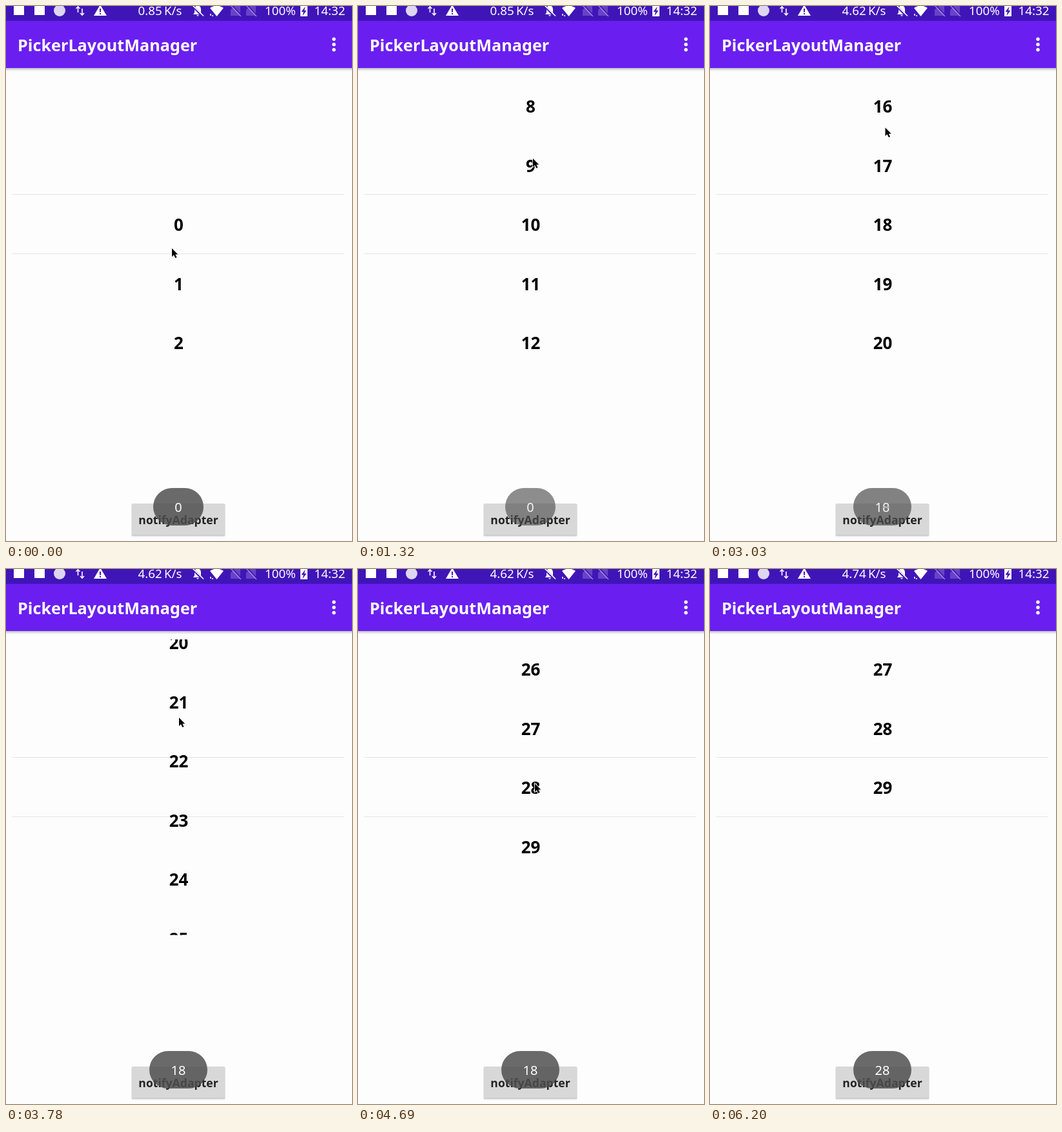
An HTML page for the animation above (6.79 s loop, 536 px wide and 828 px high).

```html
<!DOCTYPE html>
<html lang="en">
<head>
<meta charset="utf-8">
<title>Picker demo</title>
<style>
  html, body { margin: 0; width: 100%; height: 100%; overflow: hidden; background: #fdfdfd; }
  svg { display: block; width: 536px; height: 828px; }
  text { font-family: "Noto Sans", "Open Sans", sans-serif; }
  .bold { font-weight: 700; }
  .mid { text-anchor: middle; }
  .status { font-size: 18.8px; fill: #fff; }
  #items { font-size: 26px; }
  #toasts text { font-size: 20px; fill: #fff; }
</style>
</head>
<body>
<svg viewBox="0 0 536 828">
  <defs>
    <clipPath id="list"><rect x="10" y="109" width="514" height="457.5"/></clipPath>
    <linearGradient id="shade" x2="0" y2="1">
      <stop stop-color="#000" stop-opacity=".24"/>
      <stop offset="1" stop-color="#000" stop-opacity="0"/>
    </linearGradient>
    <g id="sim">
      <path d="M-1 -1H7V15H-8V6Z" fill="#fff" opacity=".2"/>
      <path d="M-7 -2L9 15" stroke="#4015b8" stroke-width="2"/>
      <path d="M-8 -1L8 16" stroke="#fff" stroke-width="1.6" opacity=".4"/>
    </g>
  </defs>

  <rect width="536" height="828" fill="#fdfdfd"/>
  <path d="M10 291.5H524M10 383.5H524" stroke="#e4e4e4"/>
  <g clip-path="url(#list)">
    <g id="items" class="bold mid"></g>
    <ellipse id="glow" cx="267" rx="771" fill="#6a1ff0"/>
  </g>

  <!-- app bar -->
  <rect y="96" width="536" height="5" fill="url(#shade)"/>
  <rect y="22" width="536" height="74" fill="#6a1ff0"/>
  <text x="18" y="69.5" class="bold" font-size="25.2" fill="#fff">PickerLayoutManager</text>
  <g fill="#fff"><circle cx="508" cy="51.3" r="2.7"/><circle cx="508" cy="59.5" r="2.7"/><circle cx="508" cy="67.7" r="2.7"/></g>

  <!-- status bar -->
  <rect width="536" height="23" fill="#4015b8"/>
  <g fill="#fff">
    <rect x="12" y="0" width="16" height="14"/>
    <rect x="44" y="0" width="16" height="14"/>
    <circle cx="83" cy="7" r="9" fill="#dcd6f2"/>
    <path d="M111.5 10V1M108.5 4L111.5 1L114.5 4M118 4V14M115 11L118 14L121 11" fill="none" stroke="#fff" stroke-width="1.6"/>
    <path d="M146 -2L156 15H136Z"/>
    <path d="M146 4V9.5M146 11V13" stroke="#4015b8" stroke-width="2"/>
    <path d="M290 13H304L302 10V5Q302 0 297 -1Q292 0 292 5V10ZM295 14H299Q297 17.5 295 14Z"/>
    <path d="M288 -1L305 16" stroke="#4015b8" stroke-width="3.5"/>
    <path d="M289 -1L306 15.5" stroke="#fff" stroke-width="1.6"/>
    <path d="M316 3Q326.5 -4 337 3L326.5 16Z"/>
    <path d="M317 12V15M320 14V16" stroke="#fff" stroke-width="1.5"/>
    <use href="#sim" x="356"/>
    <use href="#sim" x="380"/>
    <path d="M456 0H459V-2H464V0H467V16H456Z"/>
    <path d="M463.5 1L457.5 9H460.8L459.5 15L465.5 7H462.2Z" fill="#4015b8"/>
  </g>
  <g class="status">
    <text id="speed" x="204.5" y="14"></text>
    <text x="401" y="14">100%</text>
    <text x="477.5" y="14">14:32</text>
  </g>

  <!-- button -->
  <rect x="194" y="770" width="146" height="51.5" rx="3" fill="#000" opacity=".09"/>
  <rect x="195" y="771" width="144" height="49" rx="2" fill="#000" opacity=".12"/>
  <rect x="195" y="770" width="144" height="48.5" rx="2" fill="#d8d8d8"/>
  <text x="267" y="802" class="bold mid" font-size="17.6" fill="#222">notifyAdapter</text>

  <g id="toasts" class="mid"></g>
  <path id="cursor" d="M0 0V13L3 10.2L5.3 15L7.6 14L5.3 9.5H9.3Z" stroke="#fff" stroke-width="1.6" paint-order="stroke"/>
</svg>
<script>
const LOOP = 6790, FRAME = 1000 / 17.5, STEP = 91.5;
const $ = id => document.getElementById(id);
const clamp = u => Math.min(1, Math.max(0, u));
const easeIn = u => u * u;
const easeOut = u => 1 - (1 - u) ** 2;
const smooth = u => u * u * (3 - 2 * u);
const mix = (a, b, u) => a + (b - a) * u;

// drags and flings: start, end, first row, last row, easing
const scrolls = [
  [430, 690, 0, 2.7, easeIn], [690, 1270, 2.7, 10, easeOut],
  [2120, 2330, 10, 13.15, easeIn], [2330, 2740, 13.15, 18, easeOut],
  [3440, 3650, 18, 20.39, easeIn], [3650, 4555, 20.39, 28, easeOut],
  [4705, 4870, 28, 29, easeOut]
];

// time, x, y
const pointer = [
  [0, 257, 375], [400, 262, 430], [640, 271, 236], [1400, 271, 236],
  [2090, 280, 390], [2330, 275, 245], [2464, 274, 217], [2740, 272, 134],
  [2860, 272, 134], [3400, 270, 350], [3650, 268, 230], [4150, 268, 230],
  [4650, 274, 332], [4705, 274, 332], [4870, 300, 246], [5300, 310, 241],
  [5800, 310, 241], [6200, 414, 838]
];

// time, strength of the overscroll glow
const glowKeys = [[4840, 0], [5000, .48], [5390, .333], [5495, 0]];

// value, fade-in start, fade-out start, half width
const toasts = [
  [0, -1000, 1200, 39], [10, 1390, 2860, 45],
  [18, 2900, 5080, 45], [28, 5080, 9000, 45]
];

function along(keys, t, ease = u => u) {
  const i = keys.findIndex(k => k[0] > t);
  if (i < 0) return keys[keys.length - 1].slice(1);
  if (i === 0) return keys[0].slice(1);
  const a = keys[i - 1], b = keys[i];
  const u = ease((t - a[0]) / (b[0] - a[0]));
  return a.slice(1).map((v, k) => mix(v, b[k + 1], u));
}

function row(t) {
  let p = 0;
  for (const [t0, t1, a, b, ease] of scrolls)
    if (t >= t0) p = mix(a, b, ease(clamp((t - t0) / (t1 - t0))));
  return p;
}

$('items').innerHTML = Array.from({ length: 30 }, (_, i) =>
  `<text x="267.5" y="${348 + i * STEP}">${i}</text>`).join('');
$('toasts').innerHTML = toasts.map(([value, , , half]) =>
  `<g><rect x="${267 - half}" y="746" width="${half * 2}" height="58" rx="29" fill="#4d4d4d" opacity=".83"/>` +
  `<text x="267" y="782.5">${value}</text></g>`).join('');
const toastNodes = [...$('toasts').children];

function draw(t) {
  $('items').setAttribute('transform', `translate(0 ${-row(t) * STEP})`);
  $('cursor').setAttribute('transform', `translate(${along(pointer, t, smooth).join(' ')})`);

  const [s] = along(glowKeys, t);
  const glow = $('glow');
  glow.setAttribute('ry', 771 * s);
  glow.setAttribute('cy', 566.5 + 667.7 * s);
  glow.setAttribute('opacity', .35 * s);

  toasts.forEach(([, start, end], i) => {
    const shown = easeOut(clamp((t - start) / 600)) * (1 - clamp((t - end) / 500));
    toastNodes[i].setAttribute('opacity', shown);
  });

  $('speed').textContent = (t < 2690 ? '0.85' : t < 5600 ? '4.62' : '4.74') + '\u2009K/s';
}

const begin = performance.now();
function tick() {
  const t = (performance.now() - begin) % LOOP;
  // the screen refreshes in steps, as a recording does
  draw(Math.floor(t / FRAME) * 57.3);
  requestAnimationFrame(tick);
}
tick();
</script>
</body>
</html>
```
